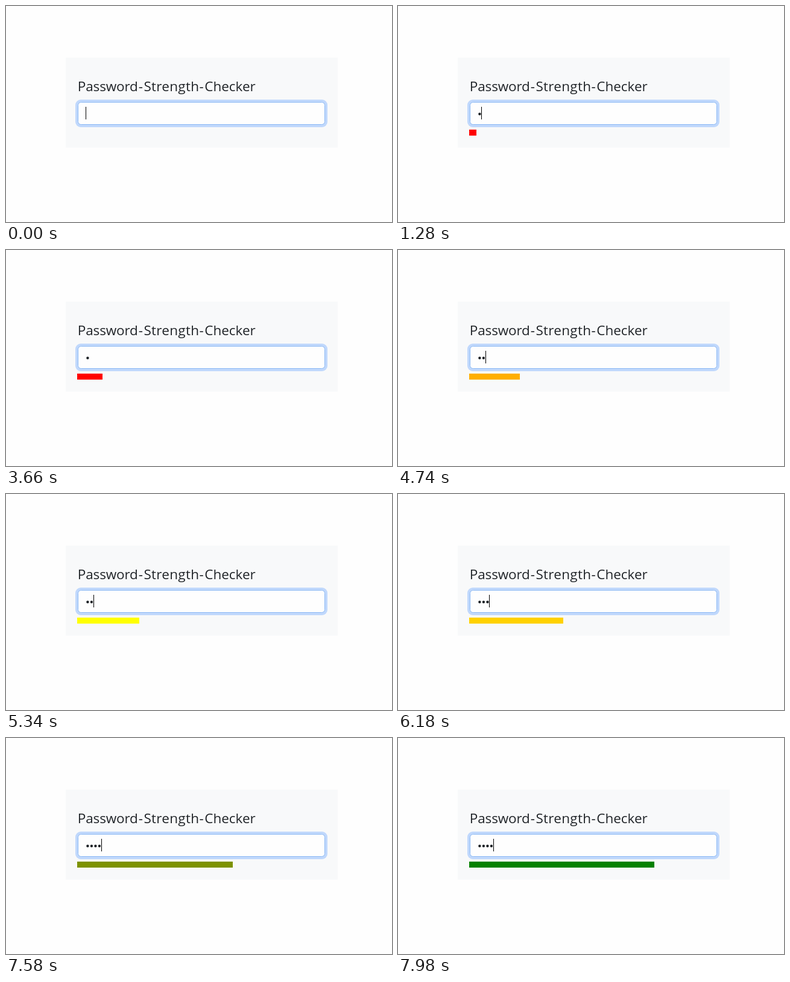
Animation of 640x360 px, one loop 8000 ms. Source, as an HTML page:

```html
<!DOCTYPE html>
<html lang="en">
<head>
<meta charset="utf-8">
<title>Password strength</title>
<style>
  html, body { margin: 0; width: 100%; height: 100%; overflow: hidden; background: #fefefe; }
  svg { display: block; width: 640px; height: 360px; }
  text { font: 22.5px "Open Sans", "Noto Sans", sans-serif; fill: #212529; }
  .tight { letter-spacing: -0.15px; }
  .loose { letter-spacing: 0.3px; }
</style>
</head>
<body>
<svg viewBox="0 0 640 360">
  <rect width="640" height="360" fill="#fefefe"/>
  <rect x="99" y="86" width="451" height="150" fill="#f8f9fa"/>
  <text y="142"><tspan x="118.8" class="tight">Password</tspan><tspan x="219.8">-</tspan><tspan x="228.4" class="loose">Strength</tspan><tspan x="320.6">-</tspan><tspan x="329.2">Checker</tspan></text>
  <rect x="115" y="156" width="418" height="46" rx="9" fill="#c0d8fc"/>
  <rect x="119.5" y="160.5" width="409" height="37" rx="5" fill="#fefefe" stroke="#8ab8f4"/>
  <g id="dots" fill="#212529"></g>
  <rect id="caret" y="168" width="1" height="21" fill="#000"/>
  <rect id="bar" x="118" y="206" height="10"/>
</svg>
<script>
const LOOP = 8000, GROW = 750, FULL = 411, STEP = 6.5;

// each key press: time, bar share, bar colour
const keys = [
  { at: 1137, share: 0.10, color: [255, 0, 0] },
  { at: 4440, share: 0.25, color: [255, 255, 0] },
  { at: 5958, share: 0.50, color: [255, 165, 0] },
  { at: 7358, share: 0.75, color: [0, 128, 0] }
];
const caretOff = [[370, 1137], [2680, 4440]];

const $ = id => document.getElementById(id);
const dots = keys.map((_, i) => {
  const c = document.createElementNS("http://www.w3.org/2000/svg", "circle");
  c.setAttribute("cx", 135.4 + i * STEP);
  c.setAttribute("cy", 180);
  c.setAttribute("r", 2.2);
  return $("dots").appendChild(c);
});

const mix = (a, b, p) => a + (b - a) * p;
const bezier = (a, b, s) => 3 * a * s * (1 - s) ** 2 + 3 * b * s * s * (1 - s) + s ** 3;

// the CSS "ease" curve
function ease(x) {
  if (x <= 0) return 0;
  if (x >= 1) return 1;
  let lo = 0, hi = 1;
  for (let i = 0; i < 24; i++) {
    const mid = (lo + hi) / 2;
    if (bezier(0.25, 0.25, mid) < x) lo = mid; else hi = mid;
  }
  return bezier(0.1, 1, lo);
}

function draw(t) {
  const typed = keys.filter(k => t >= k.at).length;
  let share = 0, color = keys[0].color;
  for (const k of keys.slice(0, typed)) {
    const p = ease((t - k.at) / GROW);
    share = mix(share, k.share, p);
    color = color.map((c, i) => mix(c, k.color[i], p));
  }
  $("bar").setAttribute("width", typed ? Math.round(share * FULL + 0.7) : 0);
  $("bar").setAttribute("fill", `rgb(${color.map(Math.round)})`);
  dots.forEach((d, i) => d.setAttribute("visibility", i < typed ? "visible" : "hidden"));
  const off = caretOff.some(([a, b]) => t >= a && t < b);
  $("caret").setAttribute("visibility", off ? "hidden" : "visible");
  $("caret").setAttribute("x", Math.floor(132 + typed * STEP));
}

const start = performance.now();
function tick() {
  draw((performance.now() - start) % LOOP);
  requestAnimationFrame(tick);
}
tick();
</script>
</body>
</html>
```
